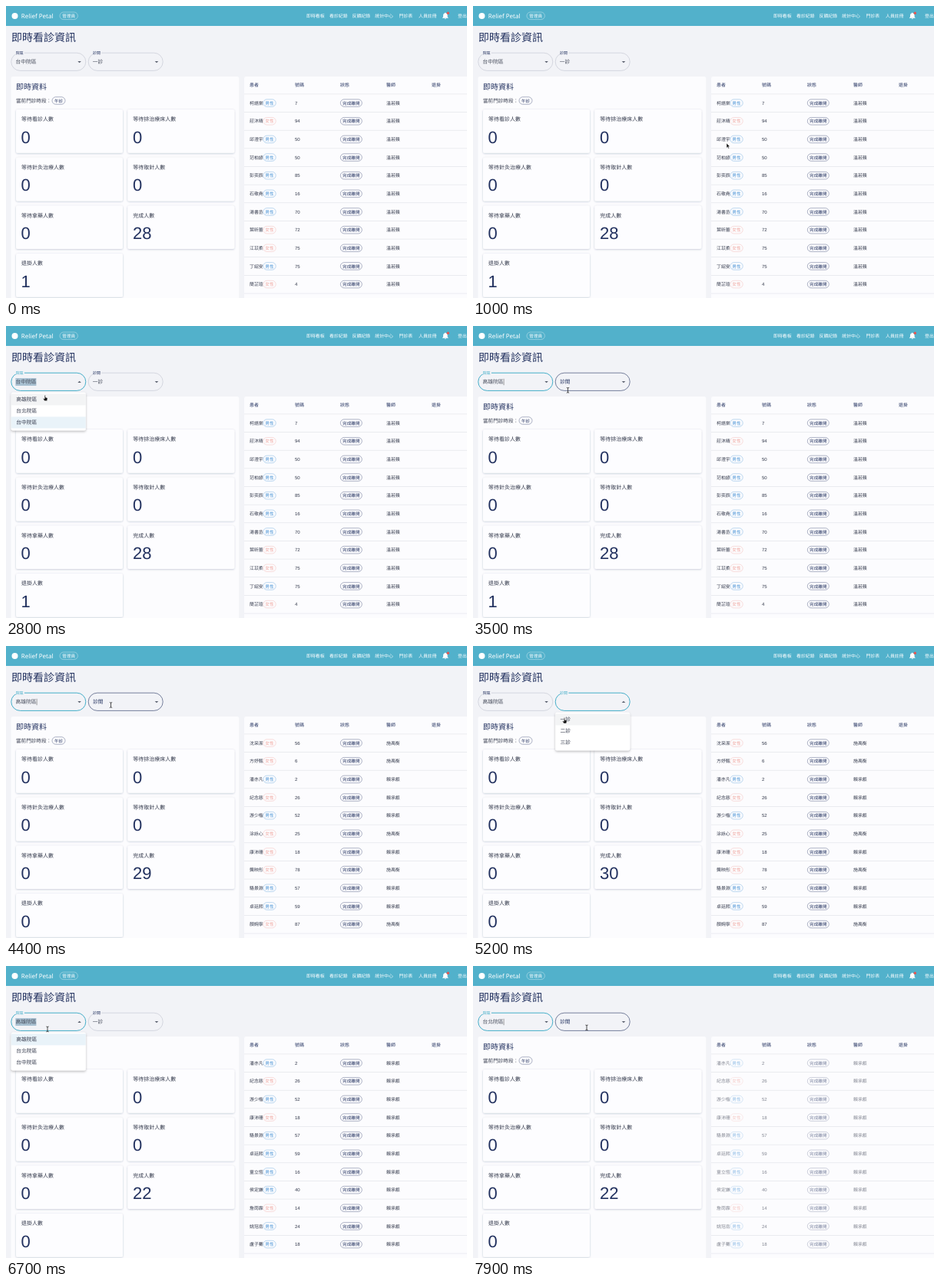
An HTML page for the animation above (8000 ms loop, 600 by 381 pixels).

```html
<!DOCTYPE html>
<html lang="zh-Hant">
<head>
<meta charset="utf-8">
<title>即時看診資訊</title>
<style>
  html, body { margin: 0; width: 100%; height: 100%; overflow: hidden; background: #f2f3f7; }
  svg { display: block; width: 100vw; height: 100vh; }
  text { font-family: 'Noto Sans', 'Noto Sans CJK TC', 'Noto Sans CJK', sans-serif; text-rendering: geometricPrecision; white-space: pre; }
  .digits { font-family: 'Liberation Sans', Arial, sans-serif; }
</style>
</head>
<body>
<svg id="stage" viewBox="0 0 600 381" preserveAspectRatio="none">
  <defs>
    <filter id="shadow" x="-10%" y="-10%" width="120%" height="130%">
      <feDropShadow dx="0" dy=".7" stdDeviation=".8" flood-color="#1f2f5c" flood-opacity=".26"/>
    </filter>
    <filter id="lift" x="-20%" y="-20%" width="140%" height="150%">
      <feDropShadow dx="0" dy="1.5" stdDeviation="1.8" flood-color="#000" flood-opacity=".28"/>
    </filter>
  </defs>
  <g id="page"></g>
  <g id="live"></g>
</svg>
<script>
const LOOP = 8000, STEP = 100;
const NAVY = '#22315f', TEAL = '#45aec9', INK = '#343a4c', BLUE = '#4a94d6', PINK = '#f0a49c';

const text = (x, cy, str, size, fill = INK, extra = '') =>
  `<text x="${x}" y="${cy + size * 0.37}" font-size="${size}" fill="${fill}" ${extra}>${str}</text>`;
const digits = (x, cy, value, size, fill) => text(x, cy, value, size, fill, 'class="digits"');
const box = (x, y, w, h, r, fill, extra = '') =>
  `<rect x="${x}" y="${y}" width="${w}" height="${h}" rx="${r}" fill="${fill}" ${extra}/>`;
const chip = (x, cy, w, str, size, color) =>
  box(x, cy - 4.8, w, 9.6, 4.8, 'none', `stroke="${color}" stroke-width=".6" stroke-opacity=".6"`) +
  text(x + w / 2, cy, str, size, color, 'text-anchor="middle"');

// Patients: [name, sex (1 = male), number, doctor]
const DOCTORS = ['溫若蘋', '施禹衡', '賴承叡'];
const parse = list => list.split(' ').map(row => row.split(','));
const taichung = parse('柯語棠,1,7,0 莊沐晴,0,94,0 邱澄宇,1,50,0 范柏諺,1,50,0 彭奕辰,1,85,0 石敬堯,1,16,0 ' +
  '湯書丞,1,70,0 葉昕蕾,0,72,0 江苡柔,0,75,0 丁紹安,1,75,0 簡芷瑄,0,4,0');
const kaohsiung = parse('沈采潔,0,56,1 方妤甄,0,6,1 潘亦凡,1,2,2 紀念慈,0,26,2 游少楷,1,52,2 涂詠心,0,25,1 ' +
  '康沛珊,0,18,2 龔映彤,0,78,1 駱景淵,1,57,2 卓廷熙,1,59,2 顏婉寧,0,87,1 ' +
  '童立恆,1,16,2 侯定謙,1,40,2 詹雨霏,0,14,2 姚冠岳,1,24,2 盧子騫,1,18,2');
const firstRoom = kaohsiung.filter(row => row[3] === '2');

const CARDS = ['等待看診人數', '等待排治療床人數', '等待針灸治療人數', '等待取針人數', '等待拿藥人數', '完成人數', '退掛人數'];
const cardX = i => 13 + (i % 2) * 145.3;
const cardY = i => 135 + Math.floor(i / 2) * 62.7;
const COLUMNS = [317, 376, 435, 495, 554];
const rowY = i => 126.6 + i * 23.65;

const AREAS = ['高雄院區', '台北院區', '台中院區'];
const ROOMS = ['一診', '二診', '三診'];
const FIELD = { y: 61.2, w: 97, h: 23.2 };
const AREA_X = 6.8, ROOM_X = 107.2;

// Moments of the interaction
const OPEN_AREA = 2300, PICK_AREA = 3150, LOAD_AREA = 4200;
const OPEN_ROOM = 4700, PICK_ROOM = 5350, LOAD_ROOM = 6300;
const REOPEN = 6500, REPICK = 7450;

// Pointer path: [time, x, y]
const PATH = [[500, 600, 150], [1000, 330, 180], [1600, 150, 112], [1700, 150, 112], [2100, 66.5, 75.6], [2500, 66.5, 75.6],
  [2900, 48, 97], [3200, 48, 97], [3500, 123.5, 83.8], [4400, 136.5, 77], [4800, 136.5, 77], [5150, 119, 97],
  [5400, 119, 97], [5900, 108.5, 96], [6400, 54, 82.4], [6800, 54, 82.4], [7200, 46, 111], [7500, 46, 111], [7900, 148, 80.4]];

const between = (t, a, b) => t >= a && t < b;
const ramp = (t, a, b) => Math.min(1, Math.max(0, (t - a) / (b - a)));

function pointerAt(t) {
  if (t < PATH[0][0]) return null;
  const next = PATH.findIndex(p => p[0] > t);
  if (next < 0) return PATH[PATH.length - 1].slice(1);
  const [a, b] = [PATH[next - 1], PATH[next]];
  const k = ramp(t, a[0], b[0]), e = k * k * (3 - 2 * k);
  return [a[1] + (b[1] - a[1]) * e, a[2] + (b[2] - a[2]) * e];
}

const inField = (p, x) => !!p && p[0] >= x && p[0] <= x + FIELD.w && p[1] >= FIELD.y && p[1] <= FIELD.y + FIELD.h;

function pointer(p, kind) {
  const at = `transform="translate(${p[0]} ${p[1]})"`;
  if (kind === 'beam')
    return `<path ${at} d="M-1.6 -3.4Q0 -3.4 0 -2.4Q0 -3.4 1.6 -3.4M0 -2.6V2.6M-1.6 3.4Q0 3.4 0 2.4Q0 3.4 1.6 3.4" fill="none" stroke="#222" stroke-width=".8"/>`;
  const d = kind === 'hand'
    ? 'M-.7 -3Q0 -3.8 .6 -3V-.6L2.6 0Q3.3 .3 3.1 1.3L2.5 4H-.8L-2.6 1.3Q-2.4 .4 -.7 1.4Z'
    : 'M0 -1V5.2L1.5 3.9L2.5 6.2L3.5 5.7L2.5 3.5H4.4Z';
  return `<path ${at} d="${d}" fill="#111" stroke="#fff" stroke-width=".5"/>`;
}

function field(x, label, value, { hover, focus, open, clear, caret }) {
  const { y, w, h } = FIELD, cy = y + h / 2 + .2, raised = value || focus;
  const color = focus ? TEAL : hover ? NAVY : '#bfc3ce';
  let out = box(x, y, w, h, h / 2, 'none', `stroke="${color}" stroke-width="${focus ? 1 : .6}"`);
  out += raised
    ? box(x + 4.6, y - 1.5, 12.5, 3, 0, '#f2f3f7') + text(x + 5.9, y + .3, label, 5, focus ? TEAL : NAVY)
    : text(x + 6, cy, label, 6.7, NAVY);
  if (value) {
    const width = value.length * 6.75;
    if (open) out += box(x + 5.6, cy - 5, width, 10, 0, '#a9c1d2');
    out += text(x + 5.6, cy, value, 6.75, '#464c5b');
    if (caret) out += box(x + 6 + width, cy - 4.2, .5, 8.4, 0, '#444');
  }
  if (clear) out += `<path d="M${x + 75.8} ${cy - 2.2}l4.4 4.4m0 -4.4l-4.4 4.4" stroke="#555b69" stroke-width=".9"/>`;
  const s = open ? -1 : 1;
  return out + `<path d="M${x + 86.5} ${cy - s}h4.6l-2.3 ${2.3 * s}z" fill="#5c6270"/>`;
}

function menu(x, options, value, p) {
  let out = box(x, 86.8, 97, 49.4, 2, '#fff', 'filter="url(#lift)"');
  options.forEach((option, i) => {
    const y = 88.4 + i * 15;
    const hover = p[0] >= x && p[0] <= x + 97 && p[1] >= y && p[1] < y + 15;
    if (option === value || hover) out += box(x, y, 97, 15, 0, option === value ? '#e9f3f9' : '#f3f4f5');
    out += text(x + 6.4, y + 7.4, option, 6.75, INK);
  });
  return out;
}

function buildPage() {
  let out = box(0, 0, 600, 381, 0, '#f2f3f7') + box(0, 0, 600, 26, 0, '#52b1cb');
  out += '<circle cx="11.5" cy="13" r="4" fill="#fff"/>' + text(19.8, 12.8, 'Relief Petal', 8, '#fff');
  out += chip(70, 12.8, 23.4, '管理員', 5.6, '#fff');
  [[391, '即時看板'], [421, '看診紀錄'], [450.5, '反饋紀錄'], [480.3, '統計中心'], [511.5, '門診表'], [537, '人員註冊'], [588, '登出']]
    .forEach(([x, label]) => out += text(x, 12.8, label, 5.9, '#fff'));
  out += '<path d="M568 15.3L569 14.2V12Q569 9.8 571.1 9.3Q571.8 7.9 572.5 9.3Q574.6 9.8 574.6 12V14.2L575.6 15.3V15.8H568ZM570.8 16.3H572.8Q571.8 18 570.8 16.3Z" fill="#fff"/>';
  out += '<circle cx="575.3" cy="9.2" r="1.7" fill="#e5554f"/>';
  out += text(7, 41, '即時看診資訊', 14, NAVY);
  out += box(6.6, 92, 296.6, 300, 2.5, '#fcfcfe') + box(310, 92, 300, 300, 2.5, '#fcfcfe');
  out += text(13, 104.8, '即時資料', 10, NAVY) + text(13, 123.5, '當前門診時段：', 6.6) + chip(60, 123.5, 17, '午診', 5.6, NAVY);
  CARDS.forEach((label, i) => {
    out += box(cardX(i), cardY(i), 139, 56.7, 2.5, '#fdfdff', 'filter="url(#shadow)"');
    out += text(cardX(i) + 7, cardY(i) + 12.7, label, 7);
  });
  ['患者', '號碼', '狀態', '醫師', '退掛'].forEach((label, i) => out += text(COLUMNS[i], 103, label, 5.9, NAVY));
  for (let i = 0; i < 12; i++) out += box(310, rowY(i) - 12, 290, .6, 0, '#dfe1e7');
  return out;
}

function table(t) {
  const rows = t < LOAD_AREA ? taichung : t < LOAD_ROOM ? kaohsiung : firstRoom;
  const start = t < LOAD_AREA ? 3600 : t < LOAD_ROOM ? 5500 : 7600;
  const busy = ramp(t, start, start + 200);
  const body = rows.slice(0, 11).map(([name, male, number, doctor], i) => {
    const y = rowY(i);
    return text(COLUMNS[0], y, name, 5.9) +
      chip(334.8, y, 16.4, male === '1' ? '男性' : '女性', 5.7, male === '1' ? BLUE : PINK) +
      digits(COLUMNS[1], y, number, 6) + chip(435.3, y, 28, '完成離開', 5.6, NAVY) +
      text(COLUMNS[3], y, DOCTORS[doctor], 5.9);
  }).join('');
  return `<g opacity="${1 - busy * .4}">${body}</g>`;
}

function numbers(t) {
  const done = Math.round(28 + 2 * ramp(t, LOAD_AREA, LOAD_AREA + 400) - 8 * ramp(t, LOAD_ROOM, LOAD_ROOM + 300));
  const values = [0, 0, 0, 0, 0, done, t < LOAD_AREA ? 1 : 0];
  return values.map((v, i) => digits(cardX(i) + 6.6, cardY(i) + 35.6, v, 22, NAVY)).join('');
}

function render(t) {
  const p = pointerAt(t);
  const areaOpen = between(t, OPEN_AREA, PICK_AREA) || between(t, REOPEN, REPICK);
  const roomOpen = between(t, OPEN_ROOM, PICK_ROOM);
  const areaFocus = between(t, OPEN_AREA, OPEN_ROOM) || t >= REOPEN;
  const roomFocus = between(t, OPEN_ROOM, REOPEN);
  const area = t < PICK_AREA ? AREAS[2] : t < REPICK ? AREAS[0] : AREAS[1];
  const room = t < PICK_AREA || between(t, PICK_ROOM, REPICK) ? ROOMS[0] : '';
  const overArea = inField(p, AREA_X), overRoom = inField(p, ROOM_X);
  const blink = (t - (t < REPICK ? PICK_AREA : REPICK)) % 1000 < 500;

  let out = table(t) + numbers(t);
  out += field(AREA_X, '院區', area, { hover: overArea, focus: areaFocus, open: areaOpen, caret: areaFocus && !areaOpen && blink });
  out += field(ROOM_X, '診間', room, { hover: overRoom, focus: roomFocus, open: roomOpen, clear: room && (roomFocus || overRoom) });
  if (areaOpen) out += menu(AREA_X, AREAS, area, p);
  if (roomOpen) out += menu(ROOM_X, ROOMS, room, p);
  if (p) {
    const overMenu = (areaOpen || roomOpen) && p[1] > 87;
    out += pointer(p, overArea || overRoom ? 'beam' : overMenu ? 'hand' : 'arrow');
  }
  live.innerHTML = out;
}

const live = document.getElementById('live');
document.getElementById('page').innerHTML = buildPage();
const begin = performance.now();
let shown = -1;
function tick() {
  const t = Math.floor(((performance.now() - begin) % LOOP) / STEP) * STEP;
  if (t !== shown) render(shown = t);
  requestAnimationFrame(tick);
}
tick();
</script>
</body>
</html>
```
